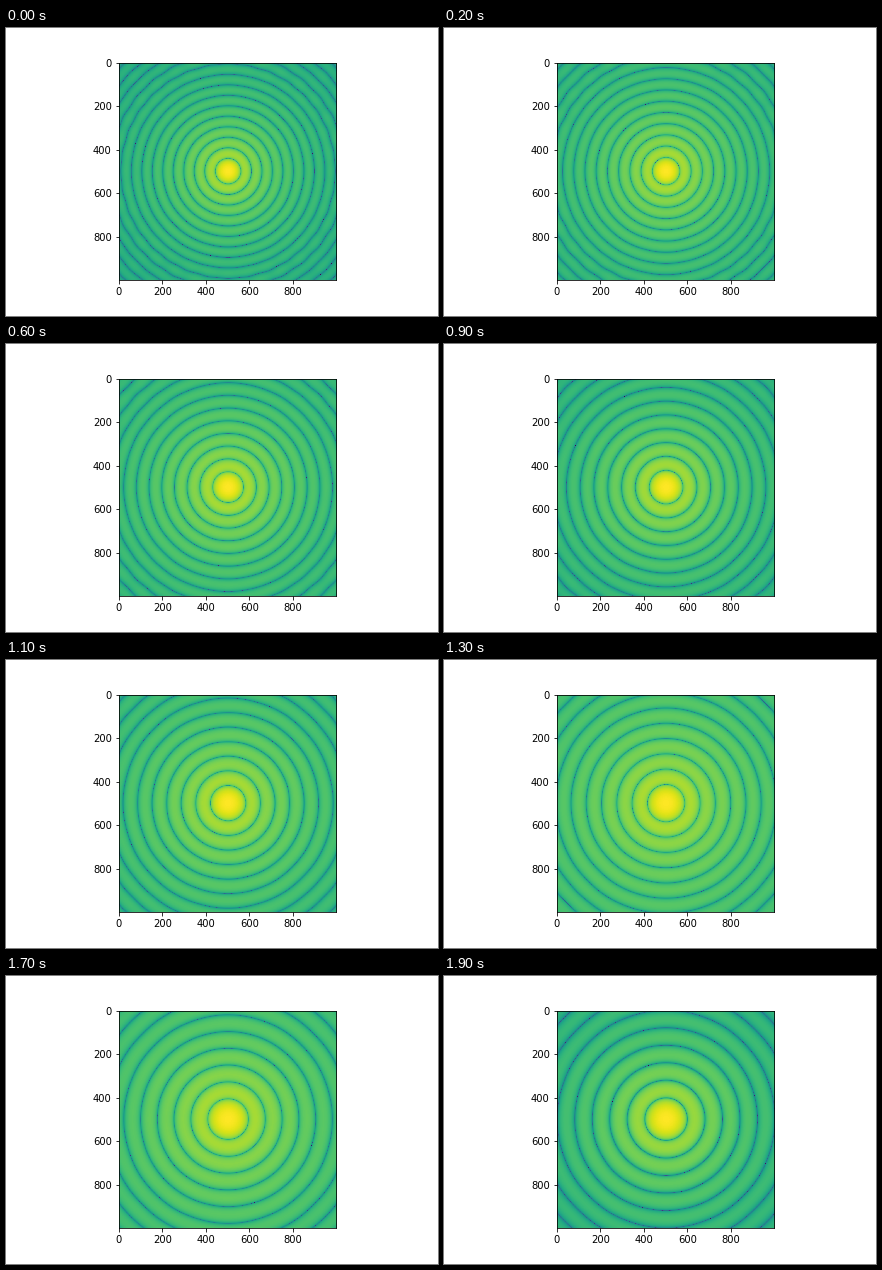
Recreate the animation shown at these times as a matplotlib script. Size 432x288 px, loop 2 s.

```python
import numpy as np
import matplotlib.pyplot as plt
from matplotlib.animation import FuncAnimation

FRAMES = 20
SIZE = 1000          # detector samples per side
PUPIL = 100          # pupil samples across the aperture

# Circular aperture; its diameter is taken from the filled area.
x = np.arange(PUPIL) + 0.5 - PUPIL / 2
aperture = (x[:, None] ** 2 + x ** 2 < (PUPIL / 2) ** 2).astype(float)
diameter = 2 * np.sqrt(aperture.sum() / np.pi)

# Fringe spacing (lambda/D in detector samples) grows linearly.
spacing = np.linspace(48, 80, FRAMES)
# Depth of the log colour scale in decades.
depth = np.interp(np.arange(FRAMES), [0, 2, 6, 9, 13, 15, 19],
                  [12.4, 13.1, 13.0, 12.3, 13.7, 14.8, 11.3])


def log_psf(k):
    u = (np.arange(SIZE) - SIZE / 2) / spacing[k]
    c = np.cos(2 * np.pi * np.outer(u, x / diameter))
    field = c @ aperture @ c.T / aperture.sum()
    return np.log10(np.maximum(field ** 2, 10 ** -depth[k]))


fig, ax = plt.subplots(figsize=(6, 4), dpi=72, facecolor="white")
fig.subplots_adjust(left=0.125, right=0.9, bottom=0.125, top=0.88)
img = ax.imshow(log_psf(0), cmap="viridis", interpolation="nearest")
ax.set_xticks(range(0, SIZE, 200))
ax.set_yticks(range(0, SIZE, 200))


def draw(k):
    img.set_data(log_psf(k))
    img.set_clim(-depth[k], 0)
    return [img]


anim = FuncAnimation(fig, draw, frames=FRAMES, interval=100,
                     init_func=lambda: draw(0), repeat=True,
                     repeat_delay=0, blit=False)
plt.show()
```
